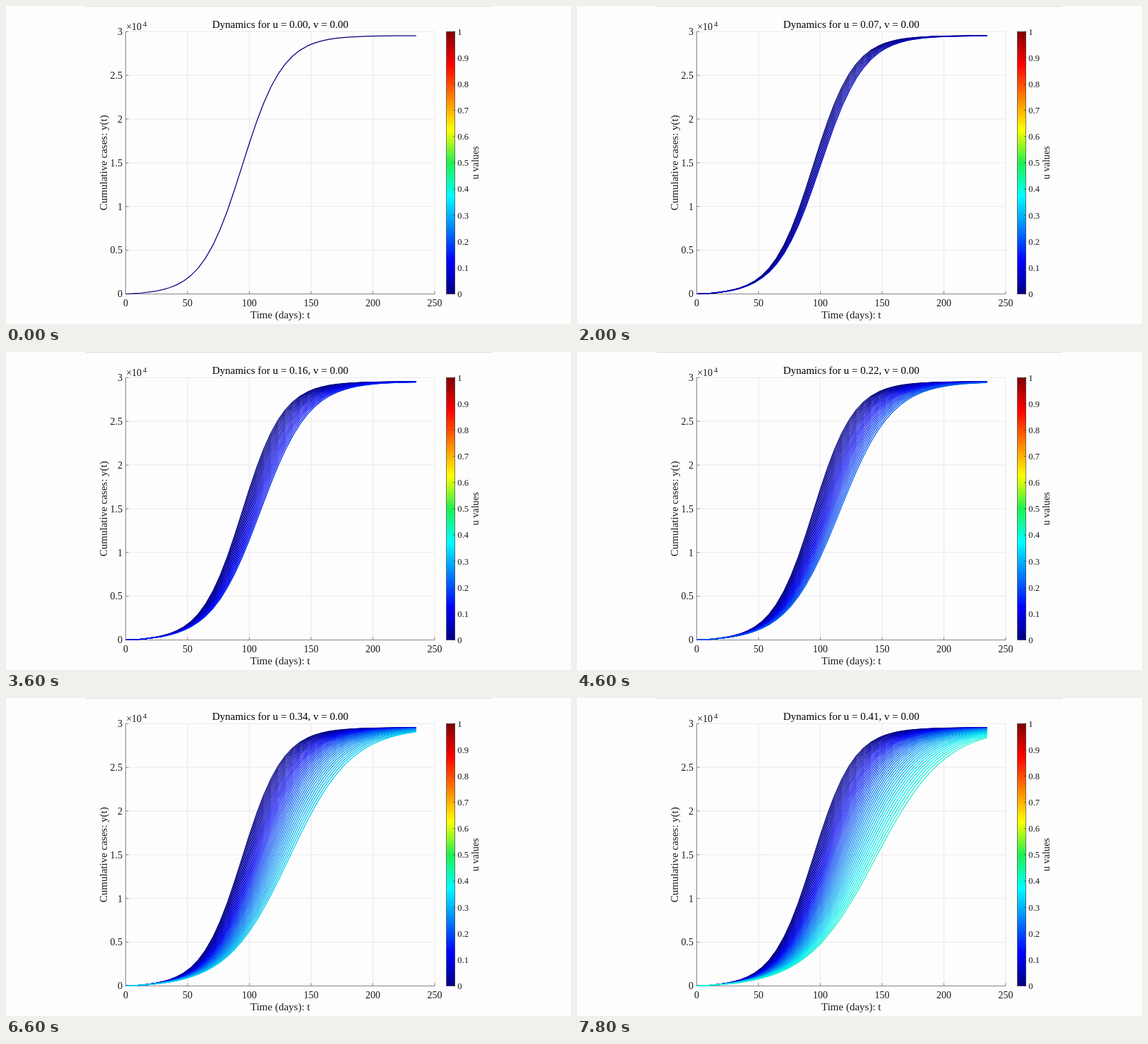
Write an HTML page that moves like this. It is 800 by 450 pixels and loops after 8 s.

```html
<!DOCTYPE html>
<html lang="en">
<head>
<meta charset="utf-8">
<title>Dynamics by u</title>
<style>
  html, body { margin: 0; width: 100%; height: 100%; overflow: hidden; background: #fefdfe; }
  svg { display: block; width: 800px; height: 450px; }
  text { font-family: "Liberation Serif", "Times New Roman", serif; fill: #1a1a1a; }
</style>
</head>
<body>
<svg id="stage" viewBox="0 0 800 450"></svg>
<script>
const NS = "http://www.w3.org/2000/svg";
const stage = document.getElementById("stage");
const LEFT = 169.5, RIGHT = 607, TOP = 36.2, BOTTOM = 407.5;
const LOOP = 8000, STEP = 200, LAST_U = 41;

const px = day => LEFT + day / 250 * (RIGHT - LEFT);
const py = cases => BOTTOM - cases / 30000 * (BOTTOM - TOP);

function add(tag, attrs, parent = stage) {
  const el = document.createElementNS(NS, tag);
  for (const k in attrs) el.setAttribute(k, attrs[k]);
  parent.appendChild(el);
  return el;
}

function line(x1, y1, x2, y2, stroke, width = 1) {
  return add("line", { x1, y1, x2, y2, stroke, "stroke-width": width });
}

function label(str, x, y, size, anchor = "middle", turn = 0) {
  const el = add("text", { x, y, "font-size": size, "text-anchor": anchor });
  if (turn) el.setAttribute("transform", `rotate(${turn} ${x} ${y})`);
  el.textContent = str;
  return el;
}

// Blue-cyan-yellow-red colour map over 0..1
function jet(v, light = 255) {
  const part = c => Math.round(light * Math.max(0, Math.min(1, 1.5 - Math.abs(4 * v - c))));
  return `rgb(${part(3)},${part(2)},${part(1)})`;
}

// Growth from outside infection P plus contagion Q, which u reduces
const K = 29530, P = 0.0002, Q = 0.0603;
function cases(day, u) {
  const q = Q * (1 - u), decay = Math.exp(-(P + q) * day);
  return K * (1 - decay) / (1 + q / P * decay);
}

function curve(u) {
  const n = 40, pts = [];
  for (let i = 0; i <= n; i++) {
    const day = 235 * i / n;
    pts.push(px(day).toFixed(2) + "," + py(cases(day, u)).toFixed(2));
  }
  return pts.join(" ");
}

function drawAxes() {
  line(113, 0.5, 687, 0.5, "#dcdcde");
  for (let d = 50; d <= 250; d += 50) line(px(d), TOP, px(d), BOTTOM, "#e9e8ea");
  for (let c = 5000; c <= 30000; c += 5000) line(LEFT, py(c), RIGHT, py(c), "#e9e8ea");
  line(LEFT, TOP, LEFT, BOTTOM, "#858585");
  line(LEFT, BOTTOM, RIGHT, BOTTOM, "#858585");
  for (let d = 0; d <= 250; d += 50) {
    line(px(d), BOTTOM, px(d), BOTTOM - 4, "#858585");
    label(d, px(d), 424.8, 14);
  }
  for (let c = 0; c <= 30000; c += 5000) {
    line(LEFT, py(c), LEFT + 4, py(c), "#858585");
    label(c / 10000, 165, py(c) + 4.8, 14, "end");
  }
  label("×10", 170.2, 33.6, 14, "start");
  label("4", 194, 29, 10.5, "start");
  label("Time (days): t", 388.3, 442, 15);
  label("Cumulative cases: y(t)", 142.7, 221.7, 15, "middle", -90);
}

function drawBar() {
  const grad = add("linearGradient", { id: "jet", x1: 0, y1: 1, x2: 0, y2: 0 }, add("defs", {}));
  for (let i = 0; i <= 8; i++) {
    const color = i === 4 ? "#20f050" : jet(i / 8);
    add("stop", { offset: i / 8, "stop-color": color }, grad);
  }
  add("rect", { x: 623.5, y: TOP, width: 12.2, height: BOTTOM - TOP,
    fill: "url(#jet)", stroke: "#333", "stroke-width": 0.6 });
  for (let i = 0; i <= 10; i++) {
    const y = BOTTOM - i / 10 * (BOTTOM - TOP);
    line(633, y, 635.7, y, "#333", 0.7);
    label(i / 10, 639.3, y + 4.4, 12.7, "start");
  }
  label("u values", 669.5, 221.7, 14.2, "middle", -90);
}

drawAxes();
drawBar();
const title = label("", 388.3, 30.8, 15);
title.style.fill = "#000";

const curves = [];
for (let i = 0; i <= LAST_U; i++) {
  curves.push(add("polyline", { points: curve(i / 100), fill: "none",
    stroke: jet(i / 100, 240), "stroke-width": 1.25, "stroke-linejoin": "round" }));
}

// Hundredths of u reached at a given step; the sweep speeds up twice
function level(step) {
  if (step < 6) return Math.floor(step / 2);
  if (step < 13) return step - 3;
  return Math.floor(10 + (step - 13) * 6 / 5);
}

function render(ms) {
  const n = level(Math.floor(ms % LOOP / STEP));
  title.textContent = `Dynamics for u = ${(n / 100).toFixed(2)}, v = 0.00`;
  curves.forEach((c, i) => c.setAttribute("visibility", i <= n ? "visible" : "hidden"));
}

const start = performance.now();
function tick() {
  render(performance.now() - start);
  requestAnimationFrame(tick);
}
tick();
</script>
</body>
</html>
```
